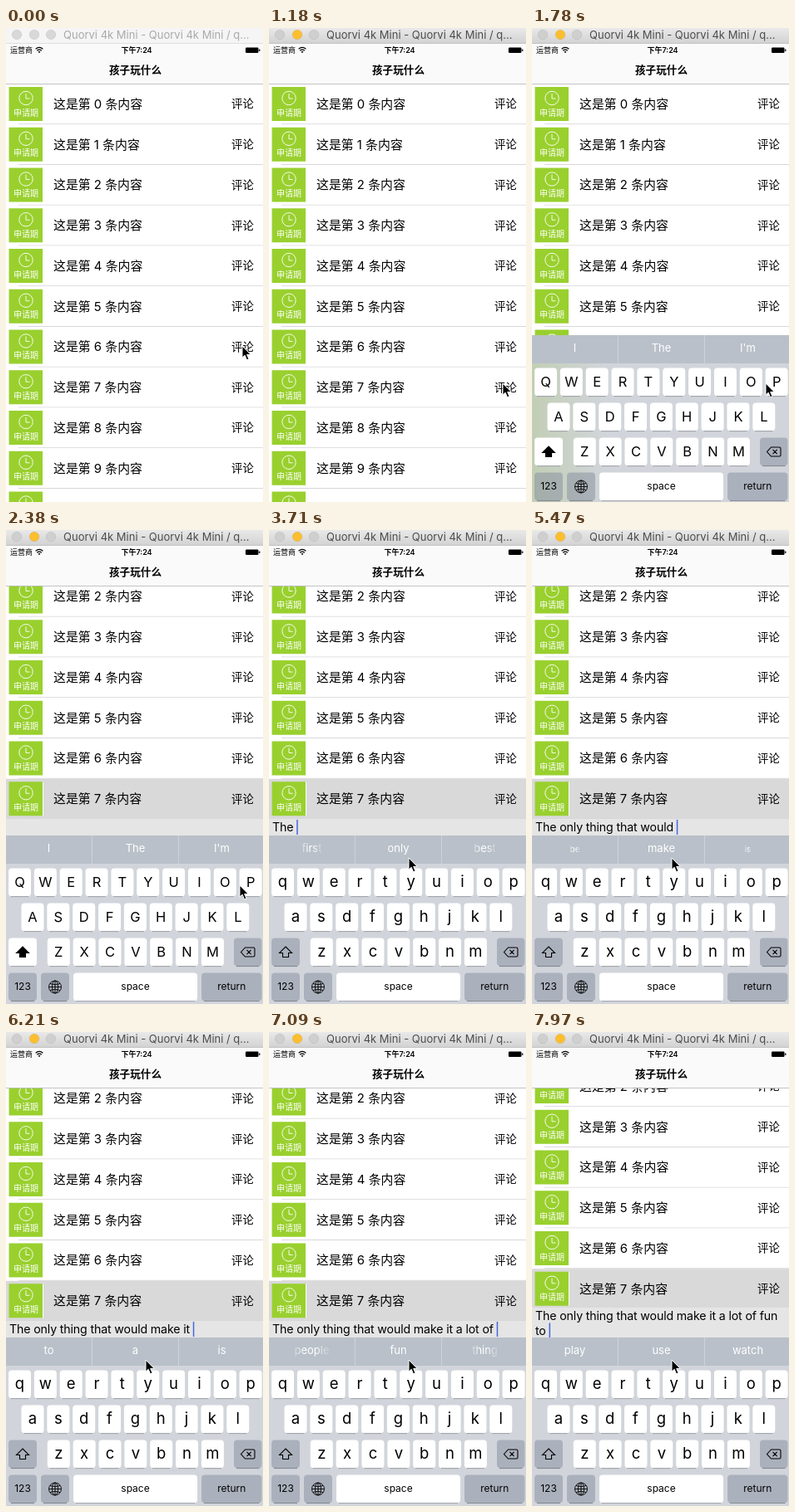
These frames come from a looping animation (309x571 px, 8000 ms). An HTML page:

```html
<!DOCTYPE html>
<html lang="zh-CN">
<head>
<meta charset="utf-8">
<style>
html, body { margin: 0; height: 100%; overflow: hidden; background: #fff; }
svg { display: block; width: 309px; height: 571px; font-family: Inter, "Noto Sans CJK SC", "Noto Sans CJK", sans-serif; }
text { white-space: pre; }
.mid { text-anchor: middle; }
.typed { font-size: 14.2px; letter-spacing: -.15px; }
</style>
</head>
<body>
<svg viewBox="0 0 309 571">
  <defs>
    <linearGradient id="bar" x2="0" y2="1"><stop stop-color="#e9e9e9"/><stop offset="1" stop-color="#d2d2d2"/></linearGradient>
    <linearGradient id="tint"><stop stop-color="#a5c06a" stop-opacity=".34"/><stop offset="1" stop-color="#a5c06a" stop-opacity="0"/></linearGradient>
    <linearGradient id="fresh"><stop stop-color="#fff" stop-opacity=".3"/><stop offset=".3" stop-color="#fff"/><stop offset=".6" stop-color="#fff"/><stop offset="1" stop-color="#fff" stop-opacity=".15"/></linearGradient>
  </defs>
  <g id="stage"></g>
</svg>
<script>
const LOOP = 8000, STEP = 147.5, ROW = 48.75;
const stage = document.getElementById('stage');

// step at which a word is picked, the word, the suggestions that follow
const picks = [
  [25, 'The', 'first only best'], [29, 'only', 'one thing way'],
  [32, 'thing', 'is that I'], [35, 'that', 'is would I'],
  [37, 'would', 'be make is'], [39, 'make', 'me it the'],
  [41, 'it', 'to a is'], [43, 'a', 'big lot good'],
  [45, 'lot', 'to of more'], [48, 'of', 'people fun thing'],
  [51, 'fun', 'and to for'], [53, 'to', 'play use watch']
];

const rect = (x, y, w, h, fill, more = '') =>
  `<rect x="${x}" y="${y}" width="${w}" height="${h}" fill="${fill}" ${more}/>`;
const text = (x, y, size, str, fill = '#000', more = '') =>
  `<text x="${x}" y="${y}" font-size="${size}" fill="${fill}" ${more}>${str}</text>`;
const path = (d, stroke = '#000', width = 1, fill = 'none') =>
  `<path d="${d}" stroke="${stroke}" stroke-width="${width}" fill="${fill}"/>`;
const mid = 'class="mid"';
const ramp = (k, a, b) => Math.min(1, Math.max(0, (k - a) / (b - a)));
const smooth = p => p * p * (3 - 2 * p);

function row(i, y, selected) {
  return rect(0, y, 309, ROW, selected ? '#d9d9d9' : '#fff') +
    rect(15, y + ROW - .9, 294, .8, '#cfcfd2') +
    rect(44, y + 3.5, 1, 41, '#fff') +
    rect(3.5, y + 3.5, 40.5, 41, '#99d02e') +
    `<circle cx="24" cy="${y + 17}" r="8.2" fill="none" stroke="#fff" stroke-width=".9"/>` +
    path(`M24 ${y + 11.5}v6h4.5`, '#fff', .9) +
    text(24, y + 38, 10, '申请期', '#fff', mid) +
    text(57, y + 29.3, 14.9, `这是第 ${i} 条内容`) +
    text(271, y + 28.8, 13.4, '评论');
}

function header(active) {
  const light = (x, c) => `<circle cx="${x}" cy="8" r="5.8" fill="${c}" stroke="#000" stroke-opacity=".1" stroke-width=".7"/>`;
  const grey = active ? '#cfcfcf' : '#d8d8d8';
  return rect(0, 18, 309, 49.5, '#fafafa') + rect(0, 67, 309, .8, '#b6b6b9') +
    rect(0, 0, 309, 18.5, active ? 'url(#bar)' : '#f5f5f5') + rect(0, 18, 309, .7, active ? '#b4b4b4' : '#d4d4d4') +
    light(13, grey) + light(34, active ? '#fdbe2f' : grey) + light(54, grey) +
    text(69, 13, 13, 'Quorvi 4k Mini - Quorvi 4k Mini / q…', active ? '#4c4c4c' : '#a9a9a9') +
    text(5, 30.3, 9, '运营商') +
    path('M35.6 25.2q4.4-3.6 8.8 0M37.2 27.2q2.8-2.2 5.6 0', '#000', 1.2) +
    path('M38.5 28.5q1.5-1.2 3 0l-1.5 1.8z', 'none', 0, '#000') +
    text(157, 30.3, 9, '下午7:24', '#000', mid + ' font-weight="600"') +
    rect(288, 23.5, 15.5, 6.5, '#000', 'rx="1.2"') + rect(304.2, 25.5, 1.2, 2.5, '#000') +
    text(155.5, 55.2, 12.6, '孩子玩什么', '#000', mid + ' font-weight="600"');
}

function key(x, y, w, label, size, grey) {
  return path(`M${x + 3} ${y + 34}h${w - 6}`, '#868a91', 1.2) +
    rect(x, y, w, 33.7, grey ? 'rgba(133,141,157,.5)' : '#fff', 'rx="4"') +
    text(x + w / 2, y + (size > 17 ? 22 : size > 14 ? 22.7 : 20.8), size, label, '#000', mid);
}

function keyboard(y, caps, words, fresh, pressed, tint) {
  let out = rect(0, y, 309, 203, '#d1d5db') +
    rect(0, y + 34, 90, 170, 'url(#tint)', `opacity="${tint}"`) +
    rect(0, y, 309, 34, '#b9c0c9');
  if (pressed) out += rect(103.5, y, 104, 34, '#ebedf0');
  out += rect(103, y, .8, 34, '#d3d7dc') + rect(207, y, .8, 34, '#d3d7dc');
  words.forEach((w, i) => {
    const side = fresh && i !== 1;
    const fill = side ? 'url(#fresh)' : pressed && i === 1 ? '#000' : '#fff';
    out += text(51.5 + 104 * i, y + 20, side && w.length < 3 ? 10 : 13, w, fill, mid);
  });
  const rows = y + 39.5;
  ['QWERTYUIOP', 'ASDFGHJKL', 'ZXCVBNM'].forEach((letters, r) =>
    [...letters].forEach((c, i) => {
      const x = [3, 18.5, 49.8][r] + 30.85 * i;
      out += key(x, rows + 42 * r, 27, caps ? c : c.toLowerCase(), caps ? 16.5 : 18.5);
    }));
  const y3 = rows + 84, y4 = rows + 126, c3 = y3 + 17, c4 = y4 + 17;
  return out + key(3, y3, 34, '', 12, !caps) + key(274, y3, 33.5, '', 12, true) +
    path(`M20 ${c3 - 6.5}l7.5 7.5h-4v5h-7v-5h-4z`, '#000', 1.1, caps ? '#000' : 'none') +
    path(`M282.5 ${c3}l5-5.5h10q1.5 0 1.5 1.5v8q0 1.5-1.5 1.5h-10zM289.5 ${c3 - 2.6}l5.2 5.2m0-5.2l-5.2 5.2`, '#000', 1.1) +
    key(3, y4, 34, '123', 12, true) + key(42, y4, 34, '', 12, true) +
    key(81, y4, 149, 'space', 12) + key(235, y4, 72.5, 'return', 12, true) +
    `<g fill="none" stroke="#000" stroke-width=".9"><circle cx="59" cy="${c4}" r="7.5"/><ellipse cx="59" cy="${c4}" rx="3.6" ry="7.5"/>` +
    `<path d="M51.5 ${c4}h15M59 ${c4 - 7.5}v15M53 ${c4 - 4}q6 2.6 12 0M53 ${c4 + 4}q6-2.6 12 0"/></g>`;
}

function draw(k) {
  const done = picks.filter(p => p[0] <= k), last = done[done.length - 1], next = picks[done.length];
  const words = last ? last[2].split(' ') : ['I', 'The', "I'm"];
  const pressed = next && next[0] === k + 1 && next[0] - (last ? last[0] : 0) > 2;
  const slide = smooth(ramp(k, 12, 16)), wrap = ramp(k, 52, 54);
  const scroll = 109 * slide + 14.5 * wrap;
  let out = '';
  for (let i = 0; i < 11; i++) out += row(i, 67.5 + ROW * i - scroll, i === 7 && k >= 10);

  const top = 348 + 109 * (1 - slide) - 16 * wrap;
  if (k >= 12) {
    const typed = done.map(p => p[1] + ' ');
    const lines = [typed.slice(0, 11).join('')];
    if (typed.length > 11) lines.push(typed[11]);
    out += rect(0, top, 309, 571 - top, '#e5e5e5');
    lines.forEach((l, i) => out += text(4, top + 15.2 + 17.5 * i, 14.2, l, '#000', 'class="typed"'));
    if (k >= 25 || k >= 17 && (k - 17) % 6 < 4)
      out += rect(4, top + 1 + 17.5 * (lines.length - 1), 1.5, 18, '#4468dc', 'id="caret"');
  }
  if (k >= 10) {
    const drop = 203 * Math.exp(-2.3 * (k - 10));
    out += keyboard(368 + (drop < .5 ? 0 : Math.round(drop)), !last, words, last && last[0] === k, pressed, 1 - slide);
  }
  out += header(k >= 6);

  const a = smooth(ramp(k, 3, 8)), b = smooth(ramp(k, 16, 23));
  out += `<g transform="translate(${284 - 3 * a - 113 * b} ${383 + 45 * a - 33 * b})">` +
    path('M0 0V14.2l3.2-3 2.3 5.6 2.5-1-2.3-5.4h4.5z', '#fff', 1, '#000') + '</g>';
  stage.innerHTML = out;

  const caret = document.getElementById('caret');
  if (caret) {
    const lines = stage.querySelectorAll('.typed');
    caret.setAttribute('x', 4 + lines[lines.length - 1].getComputedTextLength());
  }
}

const start = performance.now();
let shown = -1;
function tick() {
  const k = Math.floor((performance.now() - start) % LOOP / STEP);
  if (k !== shown) draw(shown = k);
  requestAnimationFrame(tick);
}
tick();
</script>
</body>
</html>
```
